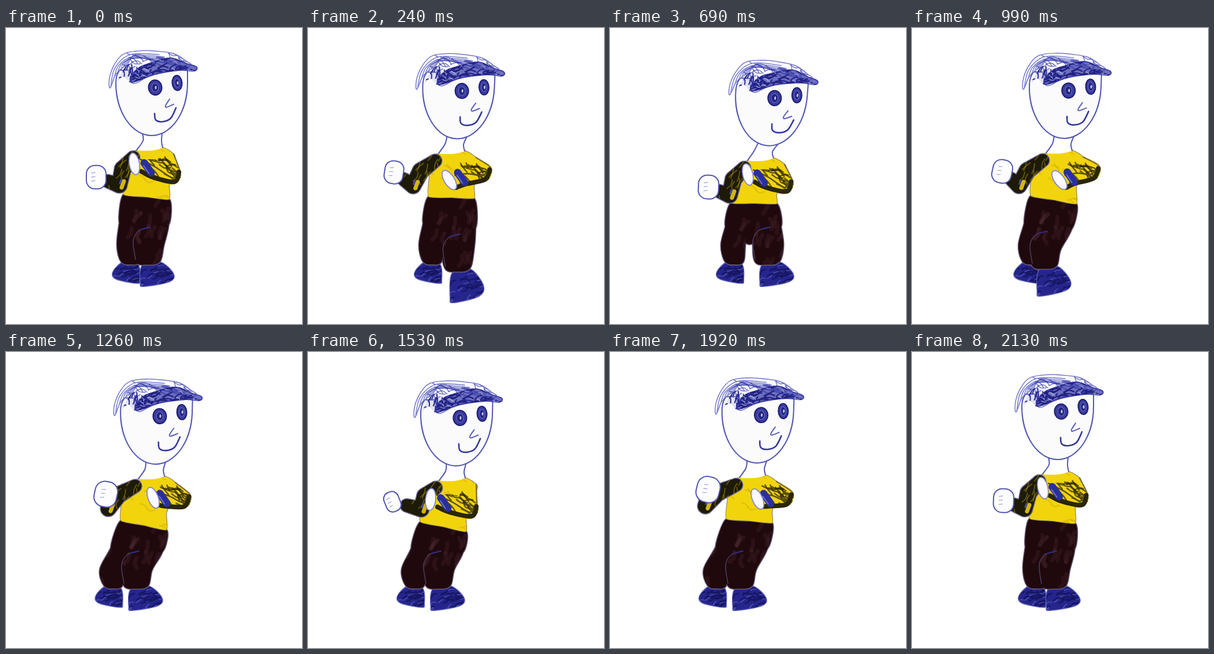
An HTML page with a canvas that plays this animation: 512 px wide and 512 px high, repeating every 2.16 s.

```html
<!DOCTYPE html>
<html lang="en">
<head>
<meta charset="utf-8">
<title>Dancing doodle</title>
<style>
html, body { margin: 0; width: 100%; height: 100%; overflow: hidden; background: #fff; }
canvas { display: block; }
</style>
</head>
<body>
<canvas id="stage" width="512" height="512"></canvas>
<script>
const c = document.getElementById('stage').getContext('2d');
const LOOP = 2160, BEAT = 720, STEP = 30;
const INK = '#5155b0', YELLOW = '#f2d40c', BLACK = '#1d1a08', CLOTH = '#1f090d';
c.lineCap = c.lineJoin = 'round';

// Sway of the body: time, neck x y, head lean, waist x y, waist tilt.
const still = [252, 208, 0, 243, 292, 6];
const sway = [
  [0, ...still],
  [450, 252, 221, 4.6, 252, 295, -1],
  [690, 264, 226, 4.6, 249, 303, 1],
  [990, 258, 213, 2.1, 245, 297, 10],
  [1530, 253, 219, 1.2, 234, 302, 12],
  [1920, 250, 214, 1.7, 241, 292, 5],
  [2130, ...still]];
// Arms repeat every beat, measured from the neck: time, elbow, hand, (size,) tilt.
const armA = [
  [0, -56, 64, -96, 50, 16, 0],
  [90, -57, 53, -107, 40, 12, -22],
  [270, -73, 60, -102, 35, 16, 12],
  [450, -86, 52, -80, 23, 19, 14]];
const armB = [
  [0, 33, 45, -30, 27, -10],
  [90, 24, 52, -41, 36, 6],
  [270, 50, 34, -3, 50, -35],
  [450, 50, 36, 6, 42, -25]];

const mix = (a, b, u) => a.map((v, i) => v + (b[i] - v) * u);
const part = (t, a, b) => Math.max(0, Math.min(1, (t - a) / (b - a)));
const ease = (t, a, b) => { const u = part(t, a, b); return u * u * (3 - 2 * u); };
const hop = (t, a, b) => Math.sin(Math.PI * part(t, a, b));

// Monotone cyclic interpolation.
function sample(rows, t, period) {
  const n = rows.length;
  let i = n - 1;
  while (i > 0 && rows[i][0] > t) i--;
  const row = j => rows[(j + n) % n];
  const time = j => row(j)[0] + Math.floor(j / n) * period;
  const span = time(i + 1) - time(i), u = (t - time(i)) / span, v = 1 - u;
  return row(i).slice(1).map((p, k) => {
    const secant = j => (row(j + 1)[k + 1] - row(j)[k + 1]) / (time(j + 1) - time(j));
    const slope = j => {
      const a = secant(j - 1), b = secant(j);
      return a * b > 0 ? 2 * a * b / (a + b) : 0;
    };
    return p * v * v * (1 + 2 * u) + row(i + 1)[k + 1] * u * u * (3 - 2 * u)
      + span * u * v * (slope(i) * v - slope(i + 1) * u);
  });
}

// Curve through flat x, y points.
function curve(p, closed = true, k = 1 / 6) {
  const n = p.length / 2, path = new Path2D();
  const at = i => {
    const j = closed ? (i + n) % n : Math.max(0, Math.min(n - 1, i));
    return [p[2 * j], p[2 * j + 1]];
  };
  path.moveTo(...at(0));
  for (let i = 0; i < n - (closed ? 0 : 1); i++) {
    const [a, b, d, e] = [at(i - 1), at(i), at(i + 1), at(i + 2)];
    path.bezierCurveTo(b[0] + (d[0] - a[0]) * k, b[1] + (d[1] - a[1]) * k,
      d[0] - (e[0] - b[0]) * k, d[1] - (e[1] - b[1]) * k, ...d);
  }
  if (closed) path.closePath();
  return path;
}

// Tapered limb: circles along joints given as [x, y, radius].
function limb(...joints) {
  const path = new Path2D();
  for (let i = 1; i < joints.length; i++)
    for (let u = 0; u <= 1; u += 1 / 16) {
      const [x, y, r] = mix(joints[i - 1], joints[i], u);
      path.moveTo(x + r, y);
      path.arc(x, y, r, 0, 7);
    }
  return path;
}

function paint(path, fill, edge, width = 2) {
  if (edge) { c.strokeStyle = edge; c.lineWidth = width; c.stroke(path); }
  if (fill) { c.fillStyle = fill; c.fill(path); }
}
const line = (pts, color, width) => paint(curve(pts, false), null, color, width);

function oval(x, y, rx, ry, tilt, fill, edge, width) {
  const path = new Path2D();
  path.ellipse(x, y, rx, ry, tilt * Math.PI / 180, 0, 7);
  paint(path, fill, edge, width);
}

let seed = 1;
const rnd = () => (seed = seed * 16807 % 2147483647) / 2147483647;

// Short pen strokes clipped to a shape.
function scribble(path, [x, y, w, h], count, len, angle, color, width, start = 7) {
  seed = start;
  c.save();
  c.clip(path);
  for (let i = 0; i < count; i++) {
    const px = x + rnd() * w, py = y + rnd() * h, a = angle + rnd() - .5;
    const dx = Math.cos(a) * len / 2, dy = Math.sin(a) * len / 2, bend = rnd() - .5;
    line([px - dx, py - dy, px - dy * bend, py + dx * bend, px + dx, py + dy], color, width);
  }
  c.restore();
}

// side is -1 for the left foot or leg and 1 for the right.
function drawFoot({ x, y, w, h, side }) {
  const shoe = [-.5, .35, -.44, -.38, .1, -.5, .5, -.02, .38, .3, -.4, .5];
  const path = curve(shoe.map((v, i) => i % 2 ? y + v * h : x + side * v * w));
  const box = [x - w / 2, y - h / 2, w, h];
  paint(path, '#25258d', '#5d60b6', 3);
  scribble(path, box, 24, 13, -.4, '#161661', 2.4);
  scribble(path, box, 12, 9, -.6, '#5559b8', 1.2, 91);
}

function legShape({ x, y, h, side }, [wx, wy], middle) {
  const half = side < 0 ? 16 : 21, ankle = x + (side < 0 ? 7 : -16), base = y - h / 2 + 1;
  const outer = ankle + side * half, inner = ankle - side * half;
  const bulge = [outer + side * 7, base - 30], calf = [inner - side * 4, base - 38];
  const thigh = [wx + (bulge[0] - wx) * .4 + side * 3, wy + (bulge[1] - wy) * .55];
  const path = curve([wx, wy, ...thigh, ...bulge, outer, base - 2, ankle, base + 3,
    inner, base - 2, ...calf, ...middle]);
  return { path, thigh, calf, inner, base };
}

function drawTrousers(feet, wl, wr, middle) {
  const [a, b] = [legShape(feet[0], wl, middle), legShape(feet[1], wr, middle)];
  const crotch = mix(a.calf, b.calf, .5);
  const hips = curve([...wl, ...wr, ...b.thigh, crotch[0], crotch[1] + 6, ...a.thigh], true, .08);
  for (const edge of ['#6a5c78', null])
    for (const path of [a.path, b.path, hips]) paint(path, edge ? null : CLOTH, edge, 3);
  for (const path of [a.path, b.path])
    scribble(path, [wl[0] - 35, wl[1] + 5, 135, 115], 26, 18, 1.9, 'rgba(85,48,55,.24)', 7);
  const [x, y] = b.calf;
  line([b.inner, b.base - 6, x, y, x + 10, y - 18, x + 30, y - 24], '#4b3a58', 1.6);
  line([x + 14, y - 20, x + 28, y - 24], '#2c2e86', 2);
}

function drawArmA(pose, [nx, ny]) {
  const [ex, ey, hx, hy] = pose.slice(0, 4).map((v, i) => v + (i % 2 ? ny : nx));
  const [size, tilt] = pose.slice(4);
  const sx = nx - 32, sy = ny + 16;
  const sleeve = limb([sx, sy, 11], [(sx + ex) / 2 - 6, (sy + ey) / 2 - 4, 14], [ex, ey, 13],
    [(ex + hx) / 2, (ey + hy) / 2, 11]);
  paint(sleeve, BLACK, '#6c6894', 3);
  scribble(sleeve, [ex - 20, sy - 12, sx - ex + 35, 75], 24, 18, 2, 'rgba(165,140,15,.55)', 1.8);
  line([ex + 8, ey - 7, ex + 4, ey + 4], '#d2b610', 7);
  line([ex + 3, ey - 9, ex + 1, ey - 3], '#4448aa', 3);
  const rx = size, ry = size * .7 + 8;
  c.save();
  c.translate(hx, hy);
  c.rotate(tilt * Math.PI / 180);
  const hand = new Path2D();
  hand.roundRect(-rx, -ry, 2 * rx, 2 * ry, rx * .85);
  paint(hand, '#fdfdff', INK, 4);
  for (const i of [-1, 0, 1]) line([-8, i * 7, -2, i * 7 - 1], '#a5a8da', 1.3);
  c.restore();
}

function drawArmB(pose, [nx, ny]) {
  const [ex, ey, px, py] = pose.slice(0, 4).map((v, i) => v + (i % 2 ? ny : nx));
  const [wx, wy] = [(ex + px) / 2, (ey + py) / 2];
  const sleeve = limb([nx + 25, ny + 19, 14], [ex, ey, 18], [wx, wy, 17], [px + 8, py + 4, 12]);
  const box = [wx - 5, wy - 18, ex - wx + 25, 40];
  paint(sleeve, YELLOW);
  scribble(sleeve, box, 20, 20, .5, 'rgba(45,39,8,.7)', 2.6, 23);
  line([nx + 38, ny + 10, ex + 15, ey - 9, ex + 17, ey + 2], '#77683a', 2.2);
  line([ex + 14, ey - 4, ex + 6, ey + 13, wx, wy + 14, px + 12, py + 13], '#2a260a', 8);
  line([px + 10, py - 8, wx + 4, wy - 4, ex + 2, ey + 6, ex + 9, ey - 3, ex, ey - 7], '#5a4f12', 2.5);
  const [bx, by] = mix([px, py], [wx, wy], .7);
  line([bx - 5, by - 8, bx + 7, by + 9], '#2b2f9c', 13);
  line([bx - 6, by - 3, bx + 3, by + 10], '#6b70c8', 2);
  oval(px, py, 8, 18, pose[4], '#fafaff', '#8084cb', 3.5);
}

function drawShirt([nx, ny], wl, wr, middle) {
  const path = curve([nx - 24, ny + 3, nx - 42, ny + 12, wl[0] + 1, ny + 46, ...wl, ...middle, ...wr,
    wr[0], ny + 62, nx + 40, ny + 14, nx + 19, ny - 1], true, .08);
  paint(path, YELLOW, '#86805e', 2.2);
  scribble(path, [nx - 50, ny, 100, 95], 26, 14, .5, 'rgba(200,166,0,.4)', 2.5);
}

function drawNeck([nx, ny], left, right) {
  const l = [...left, nx - 15, ny - 13, nx - 26, ny + 3];
  const r = [nx + 19, ny - 1, nx + 17, ny - 12, ...right];
  paint(curve([...l, nx, ny + 4, ...r], true, .1), '#fff');
  line(l, INK, 2);
  line(r, INK, 2);
}

const face = new Path2D();
face.ellipse(252, 95, 61, 90, 0, 0, Math.PI);
face.quadraticCurveTo(191, 82, 197, 74);
face.lineTo(313, 72);
face.closePath();
const crown = curve([180, 103, 180, 85, 189, 62, 205, 45, 235, 40, 262, 41, 290, 45, 310, 57,
  316, 66, 255, 79, 220, 95, 213, 65, 199, 70, 188, 82]);
const brim = curve([217, 94, 226, 72, 246, 62, 284, 52, 310, 61, 329, 67, 326, 74, 300, 73, 258, 80]);
const fringe = curve([193, 92, 203, 72, 214, 62, 228, 70, 221, 92, 214, 94, 203, 84]);

function drawCap() {
  paint(crown, '#fdfdff', '#7175c4', 3);
  c.save();
  c.clip(crown);
  for (let i = 0; i < 7; i++)
    line([181 + 4 * i, 104 - 5 * i, 188 + 6 * i, 70 - 4 * i, 215 + 8 * i, 46 + 2 * i, 265 + 9 * i, 46 + 4 * i],
      'rgba(75,80,185,.7)', 1.6);
  c.restore();
  scribble(crown, [205, 42, 110, 30], 34, 18, .3, 'rgba(55,58,165,.65)', 1.6, 31);
  paint(fringe, 'rgba(120,125,205,.2)');
  scribble(fringe, [192, 62, 38, 34], 24, 15, -1.1, '#2a2a92', 2, 53);
  paint(brim, 'rgba(60,63,168,.75)', '#3b3da2', 2);
  scribble(brim, [217, 52, 112, 42], 75, 18, -.35, '#1f1f80', 2, 17);
  scribble(brim, [225, 52, 95, 34], 18, 8, .6, '#a9ace0', 1.1, 77);
}

function drawEye(x, y, rx) {
  oval(x, y, rx, 12, -5, '#3a3c9f', '#1d1d74', 4);
  oval(x, y, rx * .5, 7, -5, '#23237f', '#6d71c4', 2);
  oval(x + 1, y, 1.5, 3, 0, '#c3c6ea');
}

function drawHead() {
  paint(face, '#fbfbfc', INK, 4);
  drawCap();
  drawEye(258, 103, 10.5);
  drawEye(296, 95, 7.5);
  line([283, 123, 276, 134, 278, 137, 290, 132], '#5b5fb5', 2);
  line([257, 148, 259, 159, 271, 162, 285, 156, 294, 138], '#34379c', 2.6);
}

function draw(t) {
  const [nx, ny, lean, wx, wy, tilt] = sample(sway, t, LOOP), neck = [nx, ny];
  const drop = 39 * Math.tan(tilt * Math.PI / 180);
  const wl = [wx - 39, wy - drop], wr = [wx + 39, wy + drop], middle = [wx, wy];

  // The right foot steps out and back, the left one follows; both close at the end.
  const close = ease(t, 1920, 2130);
  const lift = 20 * hop(t, 30, 450) + 12.5 * hop(t, 720, 1170);
  const feet = [
    { side: -1, x: 208 - 30 * (ease(t, 840, 1290) - close), y: 423, w: 45, h: 36 },
    { side: 1, x: 261 + 27 * ease(t, 30, 450) - 47 * ease(t, 720, 1050) + 20 * close,
      y: 426 + lift, w: 56, h: 41 + .8 * lift }];

  const hx = 254 + nx - 252 + 3.5 * lean, hy = 86 + ny - 208, turn = lean * Math.PI / 180;
  const onHead = (x, y) => [
    hx + (x - 254) * Math.cos(turn) - (y - 86) * Math.sin(turn),
    hy + (x - 254) * Math.sin(turn) + (y - 86) * Math.cos(turn)];

  c.fillStyle = '#fff';
  c.fillRect(0, 0, 512, 512);
  feet.forEach(drawFoot);
  drawTrousers(feet, wl, wr, middle);
  drawShirt(neck, wl, wr, middle);
  drawArmA(sample(armA, t % BEAT, BEAT), neck);
  drawArmB(sample(armB, t % BEAT, BEAT), neck);
  drawNeck(neck, onHead(236, 182), onHead(270, 182));
  c.save();
  c.translate(hx, hy);
  c.rotate(turn);
  c.translate(-254, -86);
  drawHead();
  c.restore();
}

function tick() {
  const t = Math.floor(performance.now() % LOOP / STEP) * STEP;
  draw(t < 2 * STEP ? 0 : t);
  requestAnimationFrame(tick);
}
tick();
</script>
</body>
</html>
```
